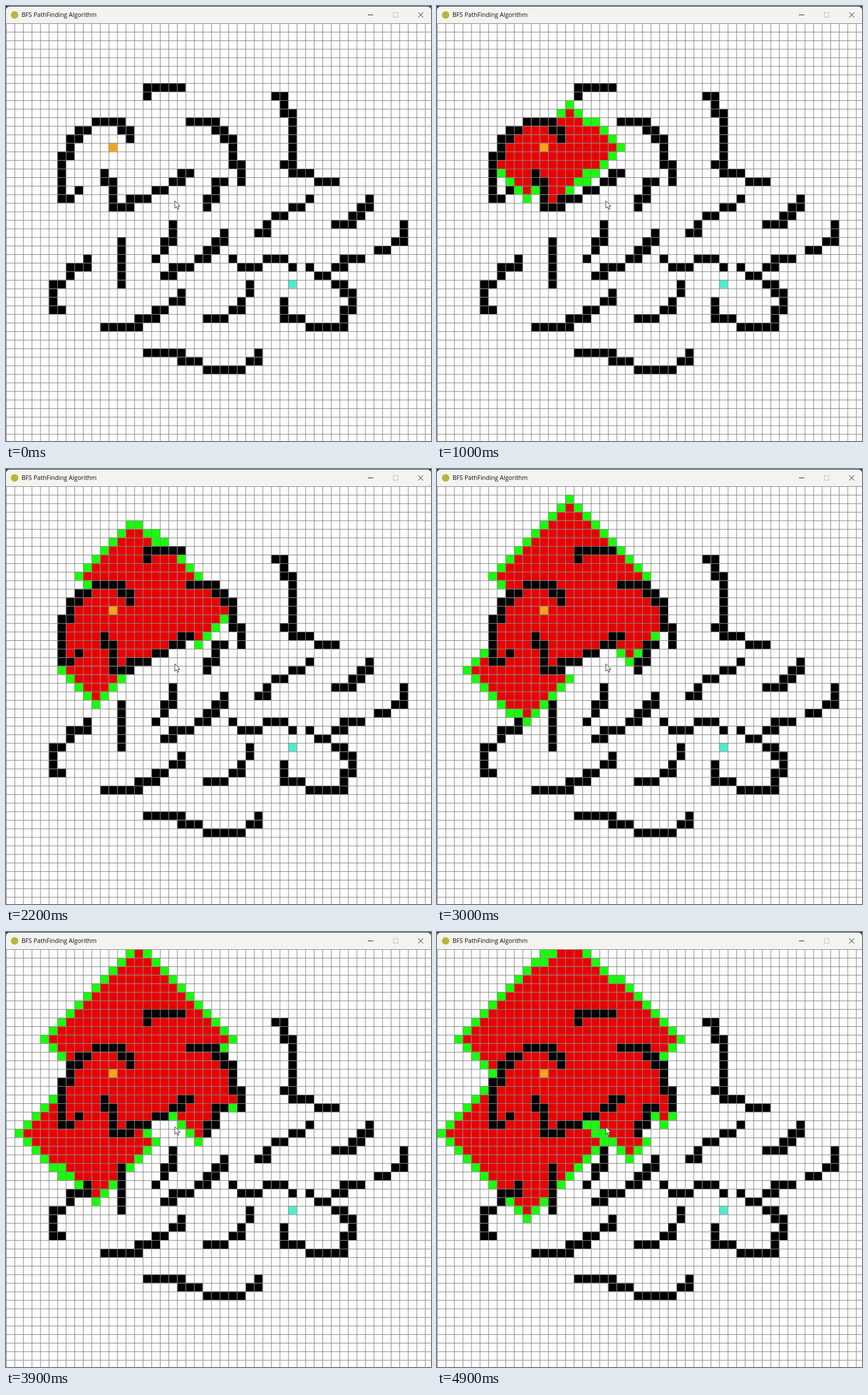
An HTML page with a canvas that plays this animation: 740x757 px, repeating every 5000 ms.

```html
<!DOCTYPE html>
<html lang="en">
<head>
<meta charset="utf-8">
<title>BFS PathFinding Algorithm</title>
<style>
  html, body { margin: 0; width: 100%; height: 100%; overflow: hidden; background: #fdfdfd; }
  canvas { display: block; }
</style>
</head>
<body>
<canvas id="stage" width="740" height="757"></canvas>
<script>
const ctx = document.getElementById('stage').getContext('2d');
const W = 740, H = 757, TOP = 30, SIZE = 14.89, N = 50;
const LOOP = 5000, TICK = 100;
const START = [12, 14], END = [33, 30];

// Hand-drawn walls: first cell, then compass moves
const strokes = [
  '16,8 N E4',
  '31,8 E S2 E S7 E2 SE E2',
  '32,16',
  '14,13 N W N W3 SW W S W S2 W S5 E NE',
  '21,11 E3 S E S E S3 E S2',
  '11,17 S E S3 E2 N E2 NE E NE E N E',
  '25,18 W S2 W S',
  '35,20 SW W SW W SW S W',
  '42,20 S W S W S W2',
  '46,23 S2 W SW W',
  '41,27 W2 S W SW W NW',
  '19,23 S2 W S SW',
  '25,24 S W S W S W SW W2 S W',
  '13,25 S5',
  '9,27 S W2 S SW W S3 E',
  '26,27 SE E2 NE E2 SE',
  '28,30 S SW S W SW W2',
  '38,30 E S E S2 W S2 W4 NW W2 N2',
  '20,31 S W SW W S W2 S W4',
  '16,38 E4 S E2 SE E4 NE E N'
];

// Cell being expanded at given times; the pace between them is even
const pace = [[1000, 17, 17], [1700, 14, 7], [2200, 17, 6], [3000, 9, 26], [3900, 6, 25], [4900, 12, 1]];

const id = (c, r) => r * N + c;
const walls = new Set();

for (const stroke of strokes) {
  const [first, ...moves] = stroke.split(' ');
  let [c, r] = first.split(',').map(Number);
  walls.add(id(c, r));
  for (const move of moves) {
    const dir = move.replace(/\d/g, '');
    const count = Number(move.replace(/\D/g, '')) || 1;
    const dx = dir.includes('E') - dir.includes('W');
    const dy = dir.includes('S') - dir.includes('N');
    for (let i = 0; i < count; i++) walls.add(id(c += dx, r += dy));
  }
}

// Breadth-first search; remember the step at which each cell opens and closes
const opened = new Map([[id(...START), 0]]);
const closed = new Map();
const queue = [START];
for (let step = 1; queue.length; step++) {
  const [c, r] = queue.shift();
  closed.set(id(c, r), step);
  for (const [dx, dy] of [[1, 0], [-1, 0], [0, 1], [0, -1]]) {
    const x = c + dx, y = r + dy, k = id(x, y);
    if (x < 0 || y < 0 || x >= N || y >= N || walls.has(k) || opened.has(k)) continue;
    opened.set(k, step);
    queue.push([x, y]);
  }
}

const keys = [[100, 0], ...pace.map(([t, c, r]) => [t, closed.get(id(c, r))])];

function stepAt(time) {
  const t = Math.floor(time / TICK) * TICK;
  if (t <= keys[0][0]) return 0;
  for (let i = 1; i < keys.length; i++) {
    const [t0, n0] = keys[i - 1], [t1, n1] = keys[i];
    if (t <= t1) return Math.round(n0 + (n1 - n0) * (t - t0) / (t1 - t0));
  }
  return keys[keys.length - 1][1];
}

function cell(c, r, color) {
  ctx.fillStyle = color;
  ctx.fillRect(c * SIZE, TOP + r * SIZE, SIZE, SIZE);
}

function drawCells(step) {
  const at = k => [k % N, Math.floor(k / N)];
  for (const [k, n] of opened) {
    if (n > step || step === 0) continue;
    cell(...at(k), closed.get(k) < step ? '#e70202' : '#18fc0a');
  }
  for (const k of walls) cell(...at(k), '#000');
  cell(...START, '#f4a616');
  cell(...END, '#50ebcd');
}

function drawGrid() {
  ctx.fillStyle = '#858585';
  for (let i = 0; i < N; i++) {
    ctx.fillRect(i * SIZE, TOP, 1, H - TOP);
    ctx.fillRect(0, TOP + i * SIZE, W, 1);
  }
}

function line(color, ...pts) {
  ctx.strokeStyle = color;
  ctx.lineWidth = 1;
  ctx.beginPath();
  pts.forEach(([x, y]) => ctx.lineTo(x, y));
  ctx.stroke();
}

function drawTitleBar() {
  ctx.fillStyle = '#3a3a3a';
  ctx.fillRect(0, 0, W, 8);
  ctx.fillStyle = '#f3f4ef';
  ctx.beginPath();
  ctx.roundRect(0, 1, W, TOP - 1, [6, 6, 0, 0]);
  ctx.fill();

  ctx.fillStyle = '#b4b83a';
  ctx.beginPath();
  ctx.arc(15, 15.5, 6.5, 0, Math.PI * 2);
  ctx.fill();

  ctx.fillStyle = '#111';
  ctx.font = '10.6px "Open Sans", "Noto Sans", sans-serif';
  ctx.fillText('BFS PathFinding Algorithm', 27, 19.3);

  line('#222', [630, 15.5], [639.5, 15.5]);
  ctx.strokeStyle = '#c3c4c0';
  ctx.strokeRect(674.5, 11.5, 8, 8);
  line('#222', [717.5, 11], [726.5, 20]);
  line('#222', [726.5, 11], [717.5, 20]);
}

function drawPointer() {
  const shape = [[0, 0], [0, 13], [3, 10.3], [5, 14.8], [6.9, 14], [5, 9.6], [8.8, 9.4]];
  ctx.beginPath();
  shape.forEach(([x, y]) => ctx.lineTo(294 + x, 339 + y));
  ctx.closePath();
  ctx.fillStyle = '#fff';
  ctx.fill();
  ctx.strokeStyle = '#222';
  ctx.lineWidth = 0.9;
  ctx.stroke();
}

function draw(time) {
  ctx.fillStyle = '#fdfdfd';
  ctx.fillRect(0, 0, W, H);
  drawCells(stepAt(time));
  drawGrid();
  drawTitleBar();
  drawPointer();
}

const begin = performance.now();
function frame() {
  draw((performance.now() - begin) % LOOP);
  requestAnimationFrame(frame);
}
frame();
</script>
</body>
</html>
```
